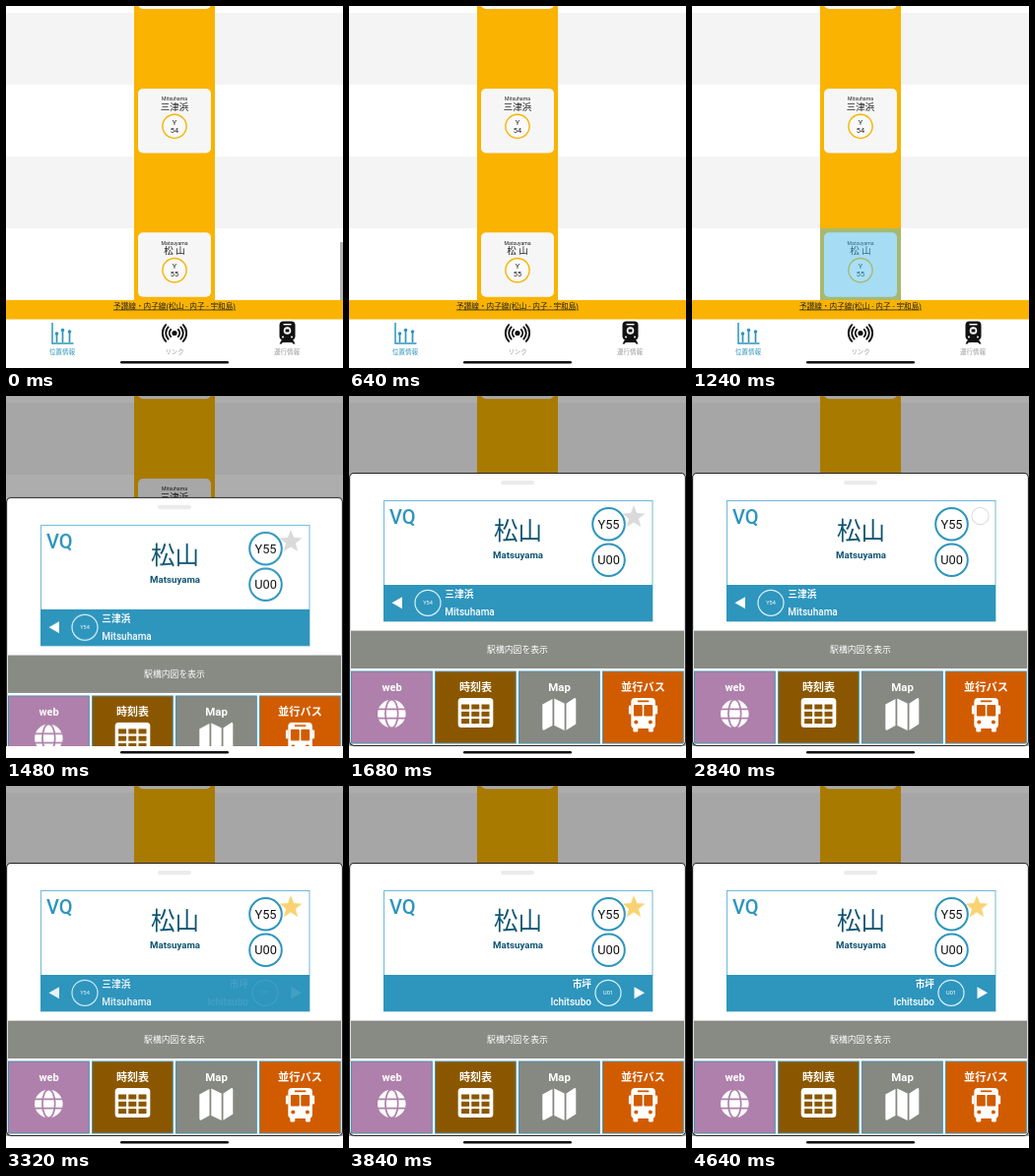
Write an HTML page that moves like this. It is 342 px wide and 368 px high and loops after 4.68 s.

```html
<!DOCTYPE html>
<html lang="ja">
<head>
<meta charset="utf-8">
<title>Station sheet</title>
<style>
  html, body { margin: 0; width: 100%; height: 100%; overflow: hidden; background: #fff; }
  svg { display: block; width: 342px; height: 368px; }
  text { font-family: Roboto, "Noto Sans CJK JP", "Noto Sans CJK", sans-serif; }
  .pop { transform-box: fill-box; transform-origin: center; }
</style>
</head>
<body>
<svg id="stage" viewBox="0 0 342 368"></svg>
<script>
const LOOP = 4680;
const GOLD = '#f9b300', BLUE = '#2e95bd', NAVY = '#0f5573', INK = '#222';

const rect = (x, y, w, h, fill, more = '') =>
  `<rect x="${x}" y="${y}" width="${w}" height="${h}" fill="${fill}" ${more}/>`;
const ring = (x, y, r, stroke, width, fill = 'none', more = '') =>
  `<circle cx="${x}" cy="${y}" r="${r}" fill="${fill}" stroke="${stroke}" stroke-width="${width}" ${more}/>`;
const path = (d, fill = 'none', more = '') => `<path d="${d}" fill="${fill}" ${more}/>`;
const label = (s, x, y, size, fill, weight = 400, anchor = 'middle', more = '') =>
  `<text x="${x}" y="${y}" font-size="${size}" fill="${fill}" font-weight="${weight}" text-anchor="${anchor}" ${more}>${s}</text>`;
const group = (id, body, more = '') => `<g id="${id}" ${more}>${body}</g>`;

function star(x, y, r, fill, id) {
  const pts = Array.from({ length: 10 }, (_, i) => {
    const a = (i * 36 - 90) * Math.PI / 180, d = i % 2 ? r * 0.43 : r;
    return `${(x + d * Math.cos(a)).toFixed(2)},${(y + d * Math.sin(a)).toFixed(2)}`;
  });
  return `<polygon id="${id}" class="pop" points="${pts.join(' ')}" fill="${fill}"/>`;
}

// Station list
function card(y, roman, name, num) {
  return rect(134, y, 74, 65.5, '#f6f6f6', 'rx="5"') +
    label(roman, 171, y + 12.3, 5.2, INK) +
    label(name, 171, y + 21.6, 9.5, INK) +
    ring(171, y + 38.3, 12.1, GOLD, 1.4, '#fafafa') +
    label('Y', 171, y + 36.6, 7.4, INK) +
    label(num, 171, y + 45, 7.4, INK);
}

function list() {
  return rect(0, 0, 342, 368, '#fff') +
    rect(0, 7, 342, 73, '#f4f4f4') + rect(0, 153, 342, 73, '#f4f4f4') +
    rect(130, 0, 82, 300, GOLD) +
    rect(134, -60, 74, 63, '#f6f6f6', 'rx="5"') +
    card(84, 'Mitsuhama', '三津浜', 54) +
    card(230.3, 'Matsuyama', '松 山', 55) +
    rect(130, 226, 82, 73, 'rgb(70,190,243)', 'id="press" opacity="0"') +
    rect(339, 240, 3, 78, '#b4b4b4', 'id="bar"') +
    rect(0, 299, 342, 19.5, GOLD) +
    label('予讃線・内子線(松山 - 内子 - 宇和島)', 171, 307.6, 7.65, INK, 400, 'middle', 'text-decoration="underline"');
}

function tabs() {
  const chart = path('M47 322V343H68.5', 'none', `stroke="${BLUE}" stroke-width="1.5"`) +
    [[51.5, 333], [57.5, 329.5], [64.5, 331]].map(([x, y]) =>
      path(`M${x} ${y}V342`, 'none', `stroke="${BLUE}" stroke-width="1.7"`) + ring(x, y, 1.8, 'none', 0, BLUE)).join('');
  const arcs = [5.2, 8.8, 12.2].map(r => {
    const dx = r * 0.72, dy = r * 0.69;
    return [-1, 1].map(s => path(`M${171 + s * dx} ${332.5 - dy}A${r} ${r} 0 0 ${s > 0 ? 1 : 0} ${171 + s * dx} ${332.5 + dy}`,
      'none', 'stroke="#111" stroke-width="1.9" stroke-linecap="round"')).join('');
  }).join('');
  const train = rect(277.5, 320.5, 16, 19, '#111', 'rx="4"') +
    path('M280 339l-2.5 4.5h2.2l1-1.6h9.6l1 1.6h2.2L291 339z', '#111') +
    rect(281.5, 323, 8, 1.4, '#fff') + ring(285.5, 330, 3.8, 'none', 0, '#fff') +
    rect(283.6, 328.5, 3.8, 3, '#111') +
    ring(281, 336.5, 1, 'none', 0, '#fff') + ring(290, 336.5, 1, 'none', 0, '#fff');
  return chart + arcs + ring(171, 332.5, 2.6, 'none', 0, '#111') + train +
    label('位置情報', 57, 353.6, 6.5, BLUE, 500) +
    label('リンク', 171, 353.6, 6.4, '#999') +
    label('運行情報', 285, 353.6, 6.5, '#999');
}

// Bottom sheet
function neighbour(id, side, name, roman, num) {
  const left = side < 0;
  const x = left ? 80 : 263, tx = left ? 97.3 : 246, anchor = left ? 'start' : 'end';
  const arrow = left ? 'M43.5 210.3L54 204.3V216.3Z' : 'M300 210.3L289.5 204.3V216.3Z';
  return group(id, path(arrow, '#fff') + ring(x, 210.3, 13, '#d9f0fa', 1.2) +
    label(num, x, 212.4, 5.6, '#fff') +
    label(name, tx, 205.2, 9.7, '#fff', 700, anchor) +
    label(roman, tx, 222.8, 10, '#fff', 500, anchor));
}

function badge(y, s) {
  return ring(263.5, y, 16.3, BLUE, 2, '#fff') + label(s, 263.5, y + 4.6, 12.8, '#111');
}

function button(i, name, fill, size, icon) {
  const x = 2.5 + i * 85;
  return rect(x, 280, 81.8, 73, fill, 'stroke="#4a93ae"') +
    label(name, x + 41, 299.8, size, '#fff', 700) + icon(x + 40.8, fill);
}

const globe = (x, fill) => ring(x, 323, 14.3, 'none', 0, '#fff') +
  path(`M${x - 14.5} 318.4h29M${x - 14.5} 327.6h29`, 'none', `stroke="${fill}" stroke-width="1.7"`) +
  `<ellipse cx="${x}" cy="323" rx="6.4" ry="14.3" fill="none" stroke="${fill}" stroke-width="1.7"/>`;

function table(x, fill) {
  let s = rect(x - 17.6, 307, 35.6, 30, '#fff', 'rx="3.5"');
  for (let i = 0; i < 9; i++)
    s += rect(x - 14.2 + i % 3 * 10.2, 313.5 + (i / 3 | 0) * 7.3, 8, 5, fill);
  return s;
}

const fold = x =>
  path(`M${x - 17} 313.5L${x - 6.8} 308V335L${x - 15.4} 339.8Q${x - 17} 340 ${x - 17} 338Z` +
    `M${x - 5} 307.5L${x + 5.4} 312.5V340L${x - 5} 335Z` +
    `M${x + 7.2} 312.5L${x + 15.6} 307Q${x + 17} 306.6 ${x + 17} 308.5V333.5L${x + 7.2} 339.8Z`, '#fff');

const bus = (x, fill) =>
  rect(x - 12, 307, 24.6, 31, '#fff', 'rx="4"') +
  rect(x - 14.4, 314.5, 2.6, 9, '#fff', 'rx="1.2"') + rect(x + 12.2, 314.5, 2.6, 9, '#fff', 'rx="1.2"') +
  rect(x - 10, 336, 5, 5.5, '#fff', 'rx="1.5"') + rect(x + 5.6, 336, 5, 5.5, '#fff', 'rx="1.5"') +
  rect(x - 5.4, 309.4, 11.4, 1.8, fill) +
  rect(x - 9.4, 314, 8.9, 11.5, fill, 'rx="1"') + rect(x + 1, 314, 8.9, 11.5, fill, 'rx="1"') +
  ring(x - 7, 331.6, 2, 'none', 0, fill) + ring(x + 7.6, 331.6, 2, 'none', 0, fill);

function sheet() {
  return rect(0.6, 78.5, 340.8, 277, '#fff', 'rx="4.5" stroke="#222" stroke-width="1.1"') +
    rect(154, 86, 34, 4.2, '#ebebeb', 'rx="2.1"') +
    rect(35.5, 106.5, 272.5, 122.5, '#fff', 'stroke="#72b8d8"') +
    rect(35, 192, 273, 37, BLUE) +
    label('VQ', 41, 130.2, 20, BLUE, 500, 'start') +
    label('松山', 171.5, 146.3, 24.5, NAVY, 500) +
    label('Matsuyama', 171.5, 164.8, 9.7, NAVY, 700) +
    badge(130.3, 'Y55') + badge(166.8, 'U00') +
    star(289, 123.2, 12.2, '#dadada', 'off') +
    ring(292.5, 122, 8.6, '#dedede', 1.1, '#fff', 'id="burst" class="pop" opacity="0"') +
    star(289, 123.2, 12.2, '#f9d373', 'on') +
    neighbour('prev', -1, '三津浜', 'Mitsuhama', 'Y54') +
    neighbour('next', 1, '市坪', 'Ichitsubo', 'U01') +
    rect(2, 238.6, 338, 38.4, '#888a84') +
    label('駅構内図を表示', 171, 261.2, 8.85, '#fff', 500) +
    button(0, 'web', '#af80ab', 11, globe) +
    button(1, '時刻表', '#8a5700', 11, table) +
    button(2, 'Map', '#868882', 11.5, fold) +
    button(3, '並行バス', '#d15c00', 11.2, bus);
}

document.getElementById('stage').innerHTML =
  '<defs><clipPath id="view"><rect width="342" height="356"/></clipPath></defs>' +
  list() + tabs() +
  group('overlay', rect(0, 0, 342, 356, '#000', 'id="scrim" opacity="0"') + group('sheet', sheet()), 'clip-path="url(#view)"') +
  rect(116, 361, 110, 2.6, '#111', 'rx="1.3"');

// Steps are [ms, value, easing to the next step]
function play(id, prop, steps) {
  const all = [[0, steps[0][1]], ...steps, [LOOP, steps[steps.length - 1][1]]];
  const frames = all.map(([t, v, easing = 'linear']) => ({ offset: t / LOOP, [prop]: v, easing }));
  document.getElementById(id).animate(frames, { duration: LOOP, iterations: Infinity });
}

const OUT = 'cubic-bezier(.33,1,.68,1)';
play('bar', 'opacity', [[120, 1], [420, 0]]);
play('press', 'opacity', [[1160, 0], [1230, 0.45], [1320, 0.45], [1460, 0]]);
play('scrim', 'opacity', [[1270, 0], [1440, 0.32]]);
play('sheet', 'transform', [[1280, 'translateY(280px)', OUT], [1640, 'translateY(0px)']]);
play('off', 'opacity', [[2600, 1], [2600, 0]]);
play('burst', 'opacity', [[2600, 0], [2600, 1], [2860, 1], [2940, 0]]);
play('burst', 'transform', [[2600, 'scale(.1)', OUT], [2800, 'scale(1)']]);
play('on', 'transform', [[2880, 'scale(0)', OUT], [3080, 'scale(1.15)', 'ease-in-out'], [3220, 'scale(1)']]);
play('prev', 'opacity', [[3300, 1], [3500, 0]]);
play('next', 'opacity', [[3300, 0], [3500, 1]]);
</script>
</body>
</html>
```
